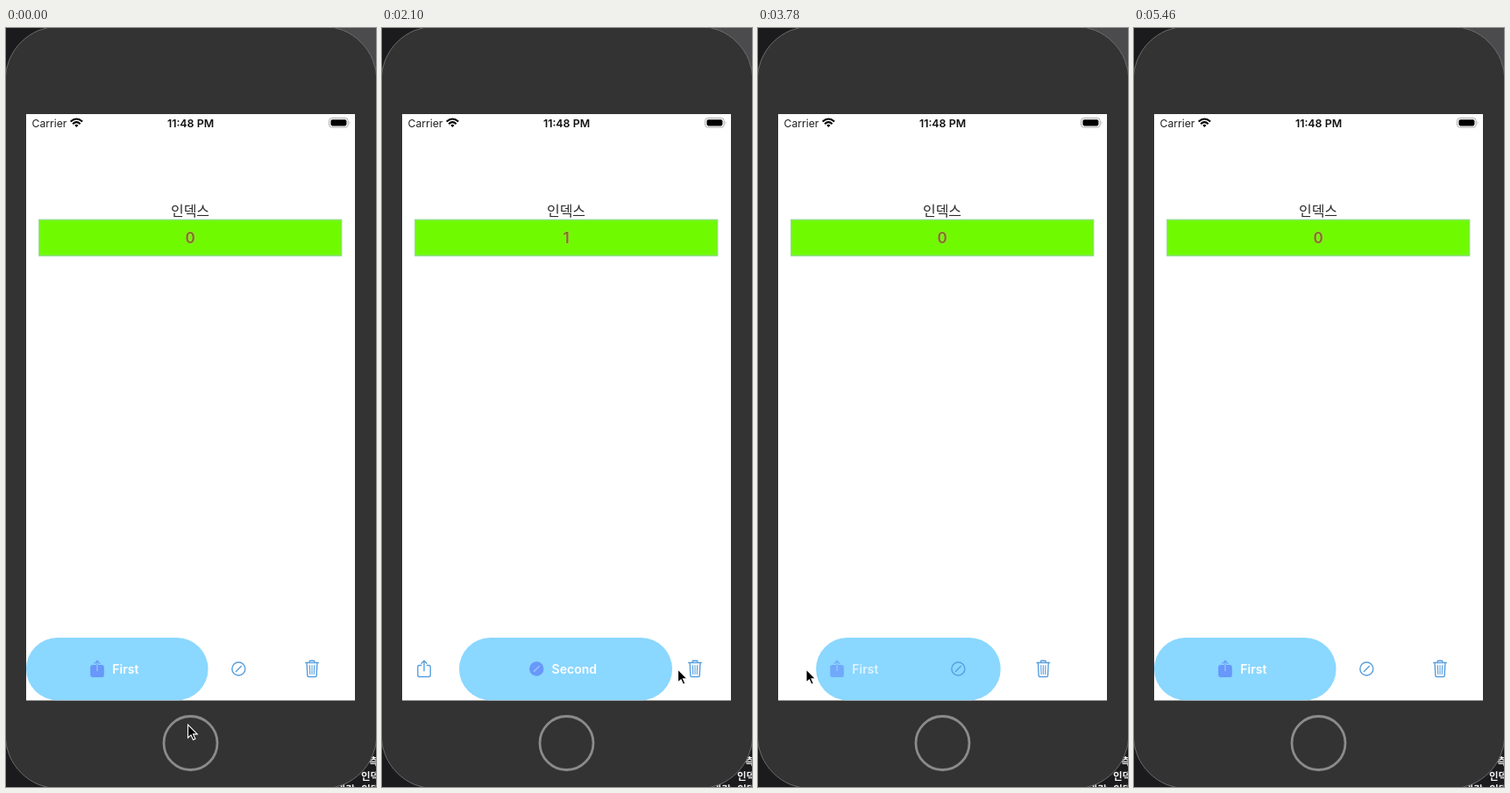
Animation, 422 px wide and 864 px high, one loop 5.53 s. Source, as an HTML page:

```html
<!DOCTYPE html>
<html lang="ko">
<head>
<meta charset="utf-8">
<title>Tab bar</title>
<style>
html, body { margin: 0; width: 100%; height: 100%; overflow: hidden; background: #1c1c1e; }
svg { display: block; width: 100vw; height: 100vh; }
text { font-family: Inter, Roboto, sans-serif; }
.ko { font-family: "Noto Sans CJK KR", "Noto Sans CJK", sans-serif; }
.line { fill: none; stroke: #589fde; stroke-width: 1.4; stroke-linecap: round; stroke-linejoin: round; }
.solid { fill: #6798fa; stroke: #6798fa; stroke-width: 1.2; stroke-linecap: round; stroke-linejoin: round; }
.solid .cut { fill: none; stroke: #a5c9ff; stroke-width: 1.1; }
.label { fill: #fff; font-size: 14px; font-weight: 600; }
</style>
</head>
<body>
<svg viewBox="0 0 422 864" preserveAspectRatio="none">
  <defs>
    <clipPath id="corner"><rect x="370" y="820" width="52" height="44"/></clipPath>
  </defs>
  <rect width="422" height="864" fill="#1b1b1d"/>
  <rect x="370" width="52" height="60" fill="#4b4b4d"/>
  <g class="ko" clip-path="url(#corner)" fill="#f2f2f2" font-size="11.5" font-weight="700">
    <text class="ko" x="414" y="839">측</text>
    <text class="ko" x="405" y="856">인덱스</text>
    <text class="ko" x="377" y="871">관람, 인덱스</text>
  </g>
  <rect x="-1" y="-2" width="424" height="868" rx="62" fill="#333" stroke="#6c6c6c"/>
  <circle cx="210.5" cy="814" r="30.5" fill="#333" stroke="#8b8b8b" stroke-width="2.8"/>
  <rect x="23" y="98" width="375" height="667.5" fill="#fff"/>

  <text x="29.5" y="112.5" font-size="12.2" fill="#222">Carrier</text>
  <g fill="none" stroke="#000" stroke-width="2.1">
    <path d="M73.7 106.6Q80.4 100.4 87.1 106.6M76.1 109.2Q80.4 105.2 84.7 109.2"/>
    <path d="M78.3 110.7Q80.4 109 82.5 110.7L80.4 113Z" fill="#000" stroke="none"/>
  </g>
  <text x="210.5" y="112.5" font-size="12.4" font-weight="600" text-anchor="middle" fill="#111">11:48 PM</text>
  <rect x="368.6" y="102.6" width="21.6" height="10.4" rx="3" fill="#fff" stroke="#aaa"/>
  <rect x="370.4" y="104.2" width="18" height="7.2" rx="1.8"/>
  <path d="M391.6 106q1.6 1.8 0 3.6z" fill="#aaa"/>

  <text class="ko" x="210" y="213.5" font-size="16" text-anchor="middle" fill="#2b2b2b">인덱스</text>
  <rect x="37.8" y="218.3" width="344.8" height="40.9" fill="#70fa00" stroke="#90dc8c" stroke-width="1.4"/>
  <text id="index" x="210" y="245" font-size="17" font-weight="600" text-anchor="middle"
        fill="#7d7420" stroke="#a5dc48" stroke-width="1.6" paint-order="stroke">0</text>

  <rect id="pill" y="694" height="71.3" rx="35.6" fill="#8ad7ff"/>
  <g id="tabs"></g>
  <path id="cursor" d="M0 0V15L3.5 11.8L6 17.3L8.4 16.2L6 10.9H10.7Z" fill="#000" stroke="#fff" stroke-width="1.1"/>
</svg>
<script>
const LOOP = 5530, STEP = 70, SLIDE = 350, ICON_Y = 729.5;

// Per selected tab: pill edges, then the three icon centres.
const layouts = [
  [23, 230.5, 104, 265.3, 349],
  [88, 331, 48, 176.3, 357],
  [179.5, 398, 53.5, 131.4, 263.3]
];
const taps = [
  { at: -SLIDE, from: 0, to: 0 },
  { at: 868, from: 0, to: 1 },
  { at: 2150, from: 1, to: 2 },
  { at: 3560, from: 2, to: 0 }
];
// Cursor stops: time, x, y.
const stops = [
  [0, 207.5, 793], [70, 207.5, 793], [770, 264.5, 735], [1240, 264.5, 735],
  [1750, 337.5, 730], [2310, 337.5, 730], [2480, 341, 730], [2920, 341, 730],
  [3430, 55, 730], [4010, 55, 730], [4330, 211, 727.5], [4600, 211, 727.5],
  [5110, 208, 797], [5420, 208, 868]
];

const trashLid = '<path d="M-7.3-7H7.3M-2.8-7V-8.6Q-2.8-9.3-2-9.3H2Q2.8-9.3 2.8-8.6V-7"/>';
const trashBody = '<path d="M-5.9-7L-5.2 7.6Q-5.1 9-3.8 9H3.8Q5.1 9 5.2 7.6L5.9-7"/>';
const trashBars = '<path class="cut" d="M-2.6-4L-2.3 6M0-4V6M2.6-4L2.3 6"/>';
const arrowHead = '<path d="M-3-6.2L0-9.2L3-6.2"';
const tabs = [
  {
    name: 'First',
    line: '<path d="M-3.2-4H-5.3Q-7.2-4-7.2-2V7Q-7.2 9-5.3 9H5.3Q7.2 9 7.2 7V-2Q7.2-4 5.3-4H3.2M0 2.2V-9"/>' + arrowHead + '/>',
    solid: '<rect x="-7.2" y="-4" width="14.4" height="13" rx="2"/><path d="M0-4V-9"/>' + arrowHead + ' fill="none"/><path class="cut" d="M0-4V2.2"/>'
  },
  {
    name: 'Second',
    line: '<circle r="7.5"/><path d="M-3 3L3-3"/>',
    solid: '<circle r="7.6"/><path class="cut" d="M-3 3L3-3"/>'
  },
  {
    name: 'Third',
    line: trashLid + trashBody + trashBars.replace('class="cut"', 'stroke-width="1.1"'),
    solid: trashLid.replace('<path', '<path fill="none"') + trashBody + trashBars
  }
];

const byId = id => document.getElementById(id);
const mix = (a, b, p) => a + (b - a) * p;
const clamp = v => Math.max(0, Math.min(1, v));
const ease = p => p < 0.5 ? 2 * p * p : 1 - 2 * (1 - p) ** 2;

byId('tabs').innerHTML = tabs.map(tab => `<g>
  <g class="line">${tab.line}</g>
  <g class="chosen"><g class="solid">${tab.solid}</g><text class="label" x="17.3" y="5.2">${tab.name}</text></g>
</g>`).join('');
const tabNodes = [...byId('tabs').children];

function drawTabs(t) {
  const tap = taps.filter(item => item.at <= t).pop();
  const p = ease(clamp((t - tap.at) / SLIDE));
  const [left, right, ...centres] = layouts[tap.from].map((v, i) => mix(v, layouts[tap.to][i], p));
  byId('index').textContent = tap.to;
  byId('pill').setAttribute('x', left);
  byId('pill').setAttribute('width', right - left);
  tabNodes.forEach((node, i) => {
    const chosen = i === tap.to;
    node.setAttribute('transform', `translate(${centres[i]} ${ICON_Y})`);
    node.children[0].setAttribute('opacity', chosen ? 0 : 1);
    node.children[1].setAttribute('opacity', chosen ? p : 0);
  });
}

function drawCursor(t) {
  const next = stops.findIndex(stop => stop[0] > t);
  const b = stops[next < 0 ? stops.length - 1 : next];
  const a = next < 0 ? b : stops[next - 1];
  const p = a === b ? 1 : ease((t - a[0]) / (b[0] - a[0]));
  byId('cursor').setAttribute('transform', `translate(${mix(a[1], b[1], p)} ${mix(a[2], b[2], p)})`);
}

function draw(now) {
  const t = Math.floor(now % LOOP / STEP) * STEP;
  drawTabs(t);
  drawCursor(t);
}

const start = performance.now();
function tick() {
  draw(performance.now() - start);
  requestAnimationFrame(tick);
}
tick();
</script>
</body>
</html>
```
